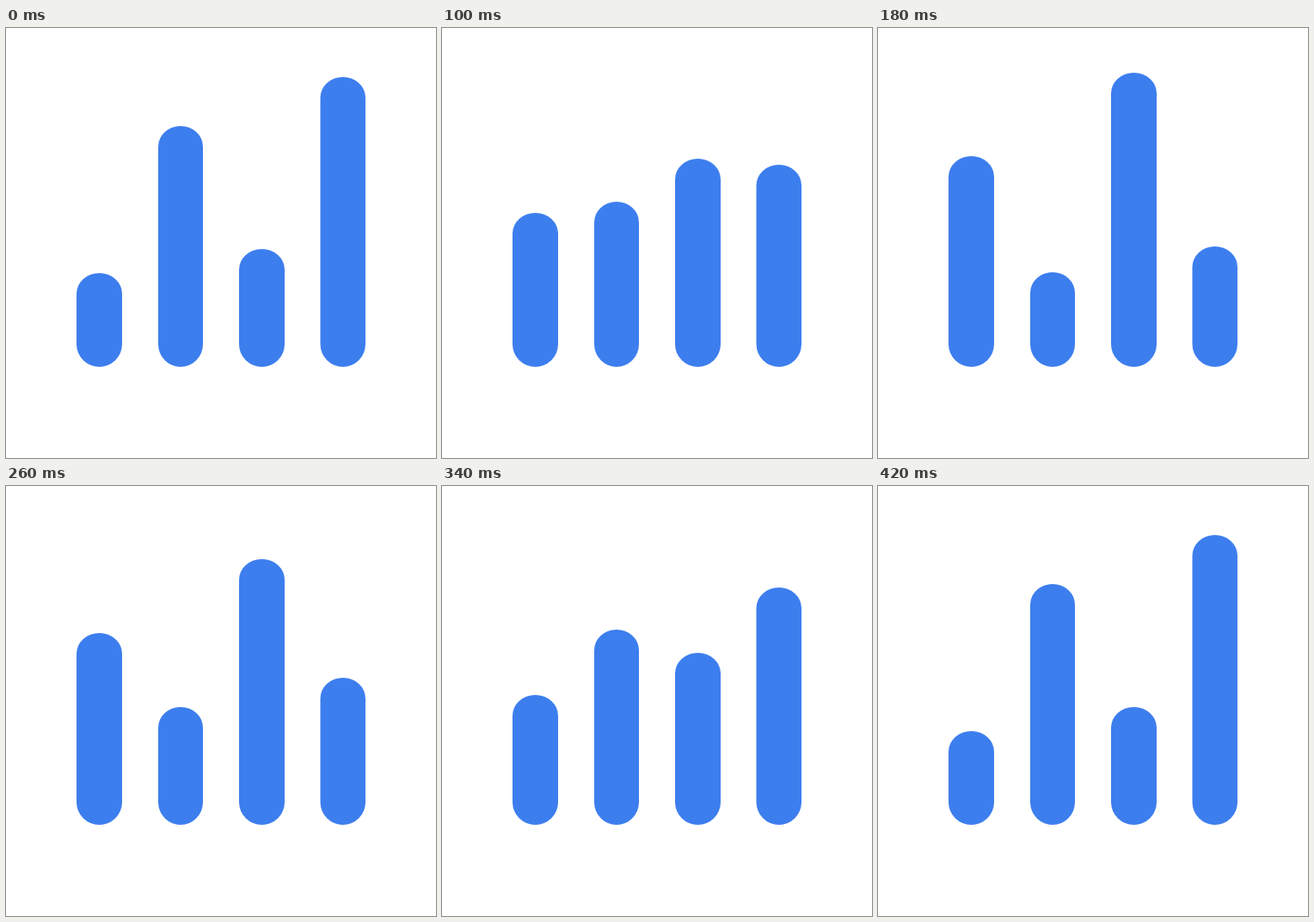
An HTML page for the animation above (440 ms loop, 500x500 px).

```html
<!DOCTYPE html>
<html lang="en">
<head>
<meta charset="utf-8">
<title>Equalizer bars</title>
<style>
  html, body { margin: 0; width: 100%; height: 100%; overflow: hidden; background: #fff; }
  svg { display: block; width: 500px; height: 500px; }
  path { fill: #3d7eee; }
</style>
</head>
<body>
<svg viewBox="0 0 500 500"></svg>
<script>
const LOOP = 440, STEP = 20, PEAK = 200, END = 420, BOTTOM = 394;
const bars = [
  { left: 82, right: 135, rest: 285, peak: 145.5 },
  { left: 177, right: 229, rest: 114, peak: 289 },
  { left: 271, right: 324, rest: 257, peak: 46 },
  { left: 365.5, right: 418, rest: 57, peak: 260 },
];

const svg = document.querySelector("svg");
for (const bar of bars) {
  bar.path = svg.appendChild(document.createElementNS(svg.namespaceURI, "path"));
}

const smooth = x => x * x * (3 - 2 * x);

// Rounded bar whose upper cap is slightly flatter than the lower one.
function outline({ left, right }, top) {
  const rx = (right - left) / 2, capTop = 24, capBottom = 26.5;
  return `M${left} ${top + capTop}A${rx} ${capTop} 0 0 1 ${right} ${top + capTop}` +
    `V${BOTTOM - capBottom}A${rx} ${capBottom} 0 0 1 ${left} ${BOTTOM - capBottom}Z`;
}

function draw(now) {
  const t = Math.floor((now % LOOP) / STEP) * STEP;
  const amount = smooth(t < PEAK ? t / PEAK : (END - t) / (END - PEAK));
  for (const bar of bars) {
    const top = Math.round(bar.rest + (bar.peak - bar.rest) * amount);
    bar.path.setAttribute("d", outline(bar, top));
  }
}

function tick() {
  draw(performance.now());
  requestAnimationFrame(tick);
}
tick();
</script>
</body>
</html>
```
